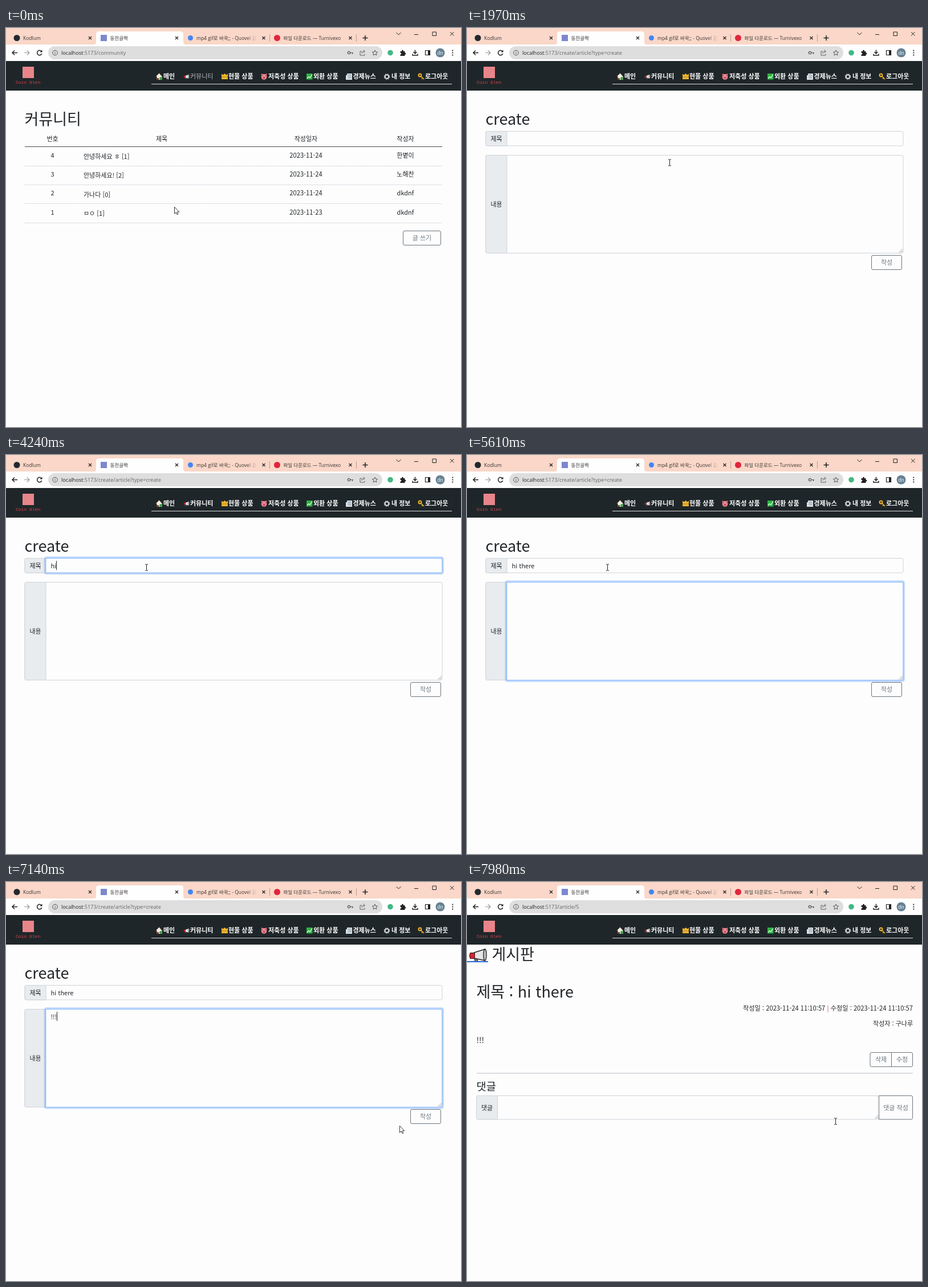
Recreate the animation shown at these times as an HTML page. Size 798x701 px, loop 8 s.

```html
<!DOCTYPE html>
<html lang="ko">
<head>
<meta charset="utf-8">
<title>커뮤니티</title>
<style>
html, body { margin: 0; width: 100%; height: 100%; overflow: hidden; background: #fdfdfd; }
svg { display: block; width: 798px; height: 701px; }
text { font: 500 11px "Noto Sans CJK KR", "Noto Sans KR", sans-serif; fill: #212529; white-space: pre; }
.ui text { font: 400 8.5px "Open Sans", "Noto Sans CJK KR", sans-serif; fill: #3a3433; }
.ui text.url { font-size: 9.15px; fill: #666; }
.ui .line { fill: none; stroke: #222; stroke-width: 1.2; }
.nav text { font-weight: 700; fill: #fff; }
.nav text.brand { font: 400 8px "Liberation Mono", monospace; fill: #d8434c; }
text.h1 { font-size: 27px; }
text.h2 { font-size: 18.7px; }
.mid { text-anchor: middle; }
.end { text-anchor: end; }
.gray { fill: #6c757d; }
.box { fill: #fdfdfd; stroke: #ced4da; }
.tag { fill: #e9ecef; stroke: #ced4da; }
.btn { fill: #fdfdfd; stroke: #6c757d; }
.grip { stroke: #777; stroke-width: .8; }
.ring { fill: none; stroke: #0d6efd; stroke-opacity: .25; stroke-width: 2.8; }
.edge { fill: none; stroke: #86b7fe; }
</style>
</head>
<body>
<svg viewBox="0 0 798 701" xmlns="http://www.w3.org/2000/svg">
  <defs>
    <linearGradient id="fade"><stop offset="0" stop-color="#fad7c8" stop-opacity="0"/><stop offset="1" stop-color="#fad7c8"/></linearGradient>
    <g id="horn">
      <path d="M10 17l2 6h5l-2-6z" fill="#777" stroke="#222"/>
      <path d="M10 7L29 1V21L10 17z" fill="#e6e6e6" stroke="#222" stroke-width="1.5"/>
      <path d="M3 7.5h8v10H3q-2-5 0-10z" fill="#d8202f" stroke="#222"/>
      <ellipse cx="29" cy="11" rx="2.6" ry="10" fill="#bfc3c7" stroke="#222" stroke-width="1.3"/>
    </g>
  </defs>
  <rect width="798" height="701" fill="#fdfdfd"/>

  <g class="ui">
    <rect width="798" height="30" fill="#fad7c8"/>
    <path d="M154 29q4 0 4-4V11q0-5 5-5h143q5 0 5 5v14q0 4 4 4z" fill="#fefefe"/>
    <rect y="29" width="798" height="29" fill="#fefefe"/>
    <circle cx="19" cy="17.500" r="5.500" fill="#24292f"/>
    <rect x="166" y="12" width="11" height="11" fill="#7d87cf"/>
    <circle cx="323.500" cy="17.500" r="4.500" fill="#4285f4"/>
    <circle cx="475.500" cy="17.500" r="5.500" fill="#e0263c"/>
    <text x="30" y="20.500">Kodlum</text>
    <text x="182.500" y="20.500">동전골짝</text>
    <text x="334" y="20.500">mp4 gif로 바꾹;; - Quovel 검</text>
    <text x="486.500" y="20.500">파일 다운로드 — Turnivexo</text>
    <rect x="422" y="10" width="18" height="16" fill="url(#fade)"/>
    <rect x="440" y="10" width="8" height="16" fill="#fad7c8"/>
    <g id="closes"></g>
    <path class="line" d="M462.500 11v13M614.500 11v13" style="stroke:#b79c92;stroke-width:1"/>
    <path class="line" d="M630 13v9M625.500 17.500h9" style="stroke-width:1.500"/>
    <path class="line" d="M684.500 8l4 4 4-4M716 11.500h7M748 7h6.500v6.500h-6.500zM779 7l6.500 6.500M785.500 7l-6.500 6.500" style="stroke-width:1"/>

    <rect x="74" y="32" width="586" height="23" rx="11.500" fill="#dedede"/>
    <path class="line" d="M20 43.500h-9M15 39.500l-4 4 4 4" style="stroke-width:1.500"/>
    <path class="line" d="M32 43.500h9M37 39.500l4 4-4 4" style="stroke:#999"/>
    <path class="line" d="M62.500 41.500a4.200 4.200 0 1 0 .3 3.500" style="stroke-width:1.500"/>
    <path d="M63.500 38.500v4h-4z" fill="#222"/>
    <g class="line" style="stroke:#555;stroke-width:1"><circle cx="86" cy="43.500" r="4.300"/><path d="M86 42.800v3M86 40.800v1"/></g>
    <text class="url" x="97" y="47"><tspan fill="#222">localhost</tspan><tspan id="path"></tspan></text>
    <g class="line" style="stroke:#555"><circle cx="601.500" cy="43.500" r="2.200"/><path d="M604 43.500h5M607.500 43.500v2.500"/>
      <path d="M624 41h-3v7h8v-2.500M623.500 45q.5-4 5-4M626.500 38.500l3 2.500-3 2.500" style="stroke-width:.9"/>
      <path d="M647 39l1.400 3 3.300.4-2.500 2.200.7 3.300-2.900-1.700-2.900 1.700.7-3.300-2.500-2.200 3.300-.4z" style="stroke-width:1"/></g>
    <circle cx="674" cy="43.500" r="4.800" fill="#41b883"/>
    <path d="M691.500 41h2.500q-.3-2.500 1.500-2.500t1.500 2.500h2.500v2.500q2 0 2 1.500t-2 1.500v2.500h-8v-2.500q2-.2 2-1.500t-2-1.500z" fill="#222"/>
    <path class="line" d="M717.500 38.500v6M714.500 42l3 3 3-3M713 45.500v2.500h9v-2.500" style="stroke-width:1.500"/>
    <path class="line" d="M735.500 39.500h8v8h-8z"/><path d="M740 39h4v9h-4z" fill="#222"/>
    <circle cx="761.500" cy="43.500" r="8" fill="#678293"/>
    <text class="mid" x="761.500" y="46.500" style="fill:#fff">dn</text>
    <path d="M782.300 38.500h2v2h-2zM782.300 42.500h2v2h-2zM782.300 46.500h2v2h-2z" fill="#333"/>
  </g>

  <g class="nav">
    <rect y="58" width="798" height="52" fill="#1f2629"/>
    <rect x="29" y="68" width="20" height="20" fill="#e8858a"/>
    <text class="brand" x="17" y="98">Coin Glen</text>
    <path d="M255 98.500h527" stroke="#dcdedf"/>
    <g id="menu"></g>
    <path d="M263 85l5.500-5.500 5 5.500v6h-9v-6z" fill="#f2efe6"/><path d="M262.500 85.500l6-6 5.500 6" stroke="#8b6b4a" fill="none"/><path d="M264 88h4v3h-4z" fill="#7a4a2c"/><circle cx="271.500" cy="88.500" r="2.500" fill="#3fa34d"/>
    <use href="#horn" transform="translate(311 81) scale(.33 .38)"/>
    <path d="M378 80.500l2.500 2 3-2.500 3 2.500 2.500-2v9.500h-11z" fill="#f0b72f"/><path d="M378 86h11" stroke="#8a5c12" stroke-dasharray="2 1"/>
    <g><path d="M447.500 80l3 1h4l3-1-.5 5h-9z" fill="#d8616d"/><circle cx="452.500" cy="86" r="4.800" fill="#f48f9a"/><ellipse cx="452.500" cy="87.500" rx="2.500" ry="1.800" fill="#c9485a"/><path d="M449.500 84h1M454.500 84h1" stroke="#222" stroke-width="1.300"/></g>
    <rect x="527" y="80" width="10.500" height="10.500" fill="#2fb344"/><path d="M528 88.500l3-3 2 2 4-6" stroke="#eaffea" fill="none" stroke-width="1.200"/>
    <path d="M598 80h9v11h-11v-8h2z" fill="#d8e0e6"/><path d="M599.500 82.500h6M599.500 85h6M599.500 87.500h6" stroke="#84939e"/>
    <circle cx="668" cy="85.500" r="3.300" fill="none" stroke="#d5dbe0" stroke-width="2"/><circle cx="668" cy="85.500" r="4.700" fill="none" stroke="#d5dbe0" stroke-width="1.200" stroke-dasharray="1.850"/>
    <circle cx="726" cy="83" r="2.400" fill="none" stroke="#f0b429" stroke-width="2"/><path d="M728 85l5 5M730.500 88l-1.500 1.500" stroke="#f0b429" stroke-width="1.600"/>
  </g>

  <g id="community">
    <text class="h1" x="32.500" y="170">커뮤니티</text>
    <g class="mid"><text x="81.500" y="199">번호</text><text x="273" y="199">제목</text><text x="526" y="199">작성일자</text><text x="700.500" y="199">작성자</text></g>
    <path d="M33 208.500h732" stroke="#4b4d43"/>
    <g id="rows"></g>
    <rect id="writeBox" class="btn" x="696.500" y="356.500" width="66" height="25" rx="2.500"/>
    <text id="writeText" class="mid" x="729.500" y="373">글 쓰기</text>
  </g>

  <g id="create">
    <text class="h1" x="32.500" y="170">create</text>
    <rect class="box" x="33" y="181.500" width="732" height="25.500" rx="2.500"/>
    <path class="tag" d="M70 181.500H35.500q-2.500 0-2.500 2.500v20.500q0 2.500 2.500 2.500H70z"/>
    <text class="mid" x="51.500" y="198.500">제목</text>
    <rect class="box" x="33" y="223.500" width="732" height="172" rx="2.500"/>
    <path class="tag" d="M70 223.500H35.500q-2.500 0-2.500 2.500v167q0 2.500 2.500 2.500H70z"/>
    <text class="mid" x="51.500" y="314">내용</text>
    <path class="grip" d="M758 394.500l6-6M761.500 394.500l2.500-2.500"/>
    <g id="focusTitle"><rect class="ring" x="68" y="179.700" width="698.500" height="29" rx="3"/><rect class="edge" x="69.500" y="181.500" width="695.500" height="25.500" rx="1"/></g>
    <g id="focusBody"><rect class="ring" x="68" y="221.700" width="698.500" height="175.600" rx="3"/><rect class="edge" x="69.500" y="223.500" width="695.500" height="172" rx="1"/></g>
    <text id="title" x="78.500" y="198.500"></text>
    <text id="body" x="78.500" y="240.500"></text>
    <rect id="caret" width="1" height="16" fill="#212529"/>
    <rect id="sendBox" class="btn" x="709.500" y="399.500" width="53" height="25" rx="2.500"/>
    <text id="sendText" class="mid" x="736" y="416">작성</text>
  </g>

  <g id="article">
    <use href="#horn" transform="translate(2.500 117)"/>
    <path d="M0 140h37" stroke="#2c66d8" stroke-width="1.800"/>
    <text class="h1" x="43.500" y="137">게시판</text>
    <text class="h1" x="16.500" y="203">제목 : hi there</text>
    <text class="end" x="782" y="225.500" style="font-size:11.200px">작성일 : 2023-11-24 11:10:57 <tspan fill="#c2475a">|</tspan> 수정일 : 2023-11-24 11:10:57</text>
    <text class="end" x="782" y="252.500">작성자 : 구나루</text>
    <text x="16.500" y="283" style="font-size:14px">!!!</text>
    <rect class="btn" x="707" y="299.500" width="74.500" height="25" rx="2.500"/>
    <path d="M744.500 299.500v25" stroke="#6c757d"/>
    <text class="mid gray" x="726" y="316">삭제</text><text class="mid gray" x="763" y="316">수정</text>
    <path d="M17 336h765" stroke="#d2d3dc" stroke-width="1.500"/>
    <text class="h2" x="16.500" y="366">댓글</text>
    <rect class="box" x="16.500" y="375.500" width="706" height="41.500" rx="2.500"/>
    <path class="tag" d="M53.500 375.500H19q-2.500 0-2.500 2.500v36.500q0 2.500 2.500 2.500h34.500z"/>
    <text class="mid" x="35" y="400.500">댓글</text>
    <path class="grip" d="M715.500 416l6-6M719 416l2.500-2.500"/>
    <path class="btn" d="M722.500 375.500H779q2.500 0 2.500 2.500v36.500q0 2.500-2.500 2.500h-56.500z"/>
    <text class="mid gray" x="752" y="400.500">댓글 작성</text>
  </g>

  <g id="cursor">
    <path id="arrow" d="M0 0V11.800L2.700 9.300 4.600 13.400 6.400 12.600 4.600 8.600H8.300z" fill="#fff" stroke="#222" stroke-width=".9"/>
    <path id="hand" d="M-1 1.500c0-1.600 2-1.600 2 0V6l4.300.9c1.200.3 1.600 1 1.500 2.200L6 14.500H0L-4 9.300c-.8-1.100.6-2.200 1.500-1.300L-1 9.300z" fill="#fff" stroke="#222" stroke-width="1"/>
    <path id="beam" d="M-2.500-5.500h2l.5.500.5-.5h2M0-5V5M-2.500 5.500h2L0 5l.5.500h2" fill="none" stroke="#222"/>
  </g>
</svg>
<script>
const $ = id => document.getElementById(id);
const LOOP = 8000, OPEN_FORM = 1540, OPEN_POST = 7800;

$('closes').innerHTML = [147.5, 299.5, 452, 604].map(x =>
  `<path class="line" d="M${x - 2.5} 15l5 5m0-5l-5 5"/>`).join('');

const menu = [[276, '메인'], [323, '커뮤니티'], [390, '현물 상품'], [460, '저축성 상품'],
  [539, '외환 상품'], [608.5, '경제뉴스'], [676, '내 정보'], [735, '로그아웃']];
$('menu').innerHTML = menu.map(([x, s]) => `<text x="${x}" y="89">${s}</text>`).join('');
const current = $('menu').children[1];

const posts = [['안녕하세요 ㅎ [1]', 24, '한볕이'], ['안녕하세요! [2]', 24, '노해찬'],
  ['가나다 [0]', 24, 'dkdnf'], ['ㅁㅇ [1]', 23, 'dkdnf']];
$('rows').innerHTML = posts.map(([name, day, who], i) => {
  const y = 227.5 + i * 33.4;
  return `<text class="mid" x="81.500" y="${y}">${4 - i}</text><text x="136" y="${y + 2.5}">${name}</text>
    <text class="mid" x="526" y="${y}" style="font-size:11.2px">2023-11-${day}</text>
    <text class="mid" x="700.500" y="${y}">${who}</text>
    <path d="M33 ${Math.round(y + 14) + .5}h732" stroke="#cfd0de" stroke-dasharray="2 1"/>`;
}).join('');

// Pointer path: time, x, y
const path = [[0, 295, 314], [340, 291, 357], [539, 291, 357], [540, 446, 407], [699, 446, 407],
  [700, 470, 407], [1050, 735, 378], [1250, 742, 373], [1560, 742, 373], [2150, 246, 197],
  [6600, 246, 197], [7150, 690, 428], [7350, 735, 418], [7550, 732, 413], [7800, 732, 413], [7970, 646, 420]];

// Hot areas per page: pointer shape, left, top, right, bottom
const areas = {
  community: [['hand', 696, 356, 763, 382]],
  create: [['beam', 70, 181, 765, 207], ['beam', 70, 223, 765, 396], ['hand', 709, 399, 763, 425]],
  article: [['beam', 54, 375, 720, 424]]
};
const urls = { community: ':5173/community', create: ':5173/create/article?type=create', article: ':5173/article/5' };

const fields = [
  { id: 'title', ring: 'focusTitle', text: 'hi there', top: 186, from: 2250, to: 4800,
    keys: [3700, 3880, 4300, 4380, 4460, 4540, 4620, 4700] },
  { id: 'body', ring: 'focusBody', text: '!!!', top: 228, from: 4800, to: 7610, keys: [5700, 5900, 6100] }
];

const ramp = (t, start) => Math.min(1, Math.max(0, (t - start) / 150));
const show = (id, on) => { $(id).style.display = on ? '' : 'none'; };

function pointer(t) {
  const i = path.findIndex(p => p[0] > t);
  if (i < 0) return path[path.length - 1].slice(1);
  const [t0, x0, y0] = path[i - 1], [t1, x1, y1] = path[i];
  const u = (t - t0) / (t1 - t0), k = u * u * (3 - 2 * u);
  return [x0 + (x1 - x0) * k, y0 + (y1 - y0) * k];
}

function button(name, k) {
  const mix = (a, b) => Math.round(a + (b - a) * k);
  $(name + 'Box').style.fill = `rgb(${mix(253, 108)},${mix(253, 117)},${mix(253, 125)})`;
  $(name + 'Text').style.fill = `rgb(${mix(108, 255)},${mix(117, 255)},${mix(125, 255)})`;
}

function draw(t) {
  const page = t < OPEN_FORM ? 'community' : t < OPEN_POST ? 'create' : 'article';
  for (const id in urls) show(id, id === page);
  $('path').textContent = urls[page];
  current.style.fill = page === 'community' ? '#b4b7b9' : '#fff';
  current.style.fontWeight = page === 'community' ? 400 : 700;

  button('write', ramp(t, 955));
  button('send', ramp(t, 7240));

  let caret = false;
  for (const f of fields) {
    const done = f.keys.filter(k => k <= t);
    const text = $(f.id);
    text.textContent = f.text.slice(0, done.length);
    $(f.ring).style.opacity = ramp(t, f.from) - ramp(t, f.to);
    const last = done.length ? done[done.length - 1] : f.from;
    if (page === 'create' && t >= f.from && t < f.to && (t - last) % 1000 < 500) {
      caret = true;
      $('caret').setAttribute('x', Math.round(78 + (done.length ? text.getComputedTextLength() : 0)));
      $('caret').setAttribute('y', f.top);
    }
  }
  show('caret', caret);

  const [x, y] = pointer(t);
  const hit = areas[page].find(([, l, top, r, b]) => x >= l && x <= r && y >= top && y <= b);
  const shape = hit ? hit[0] : 'arrow';
  for (const id of ['arrow', 'hand', 'beam']) show(id, id === shape);
  $('cursor').setAttribute('transform', `translate(${Math.round(x) + .5} ${Math.round(y) + .5})`);
}

const start = performance.now();
function tick() {
  draw((performance.now() - start) % LOOP);
  requestAnimationFrame(tick);
}
tick();
</script>
</body>
</html>
```
